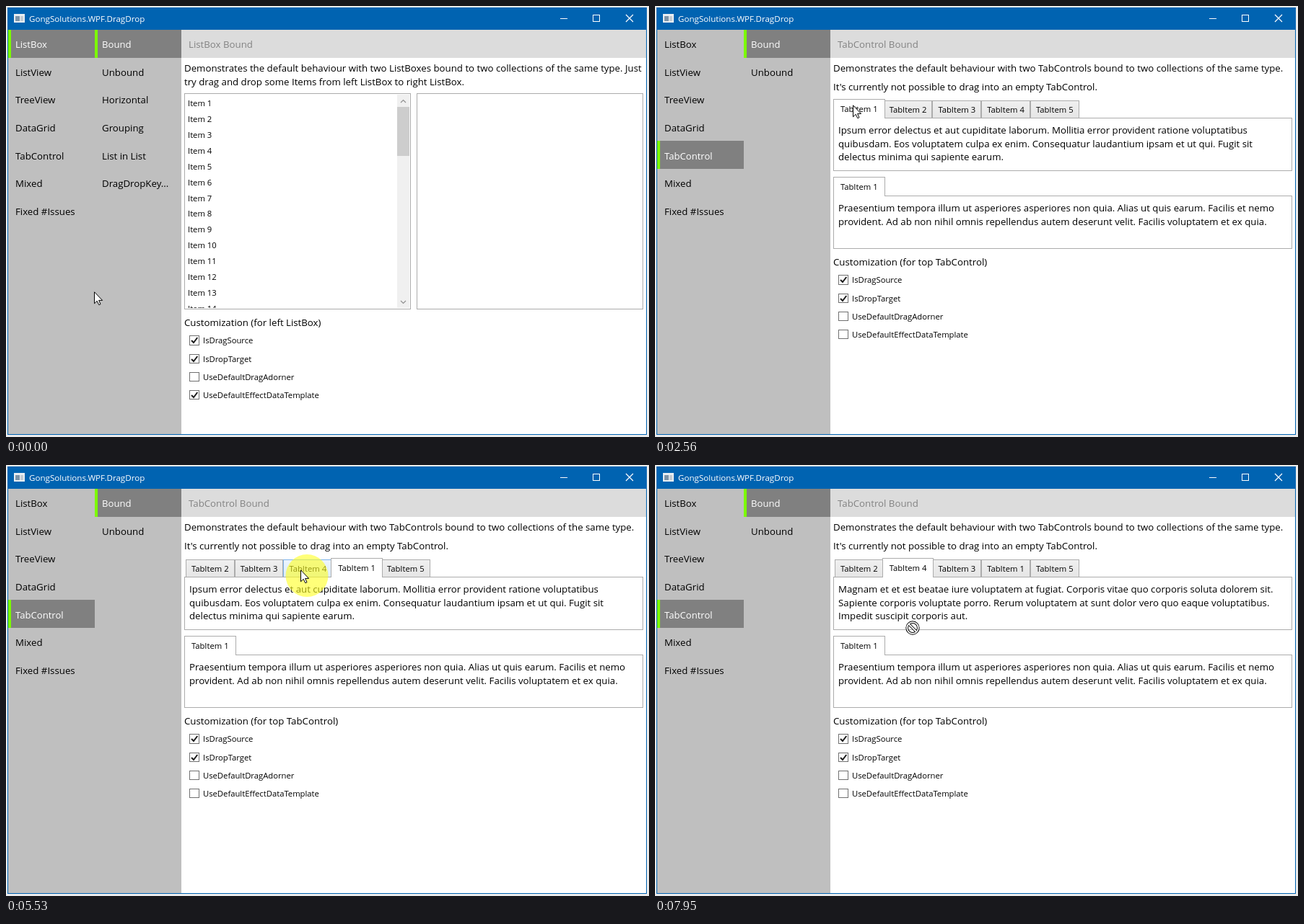
Write an HTML page that moves like this. It is 891 px wide and 598 px high and loops after 8000 ms.

```html
<!DOCTYPE html>
<html lang="en">
<head>
<meta charset="utf-8">
<title>Drag and drop demo</title>
<style>
html, body { margin: 0; width: 100%; height: 100%; overflow: hidden; background: #ececec; }
svg { display: block; }
#stage { position: absolute; left: 0; top: 0; font-family: "Open Sans", "Noto Sans", sans-serif; }
text { white-space: pre; }
.body { font-size: 13.25px; }
.selected { font-size: 13.1px; font-weight: 500; }
.small { font-size: 11.25px; }
.title { font-size: 11.6px; }
rect, .crisp { shape-rendering: crispEdges; }
</style>
</head>
<body>
<svg id="stage" width="891" height="598" viewBox="0 0 891 598"></svg>
<script>
const LOOP = 8000;
const ROW = 38.67;
const TAB_LEFT = 248.9, TAB_WIDTH = 67.75;
const BORDER = '#acacac';

const PAGE_SWITCH = 1070, FIRST_DROP = 4600, TAB_SELECT = 5620, SECOND_DROP = 6780;

// Pointer moves: first step, last step, number of steps, way points.
const START = [122, 396];
const MOVES = [
  [280, 600, 5, [33, 206]],
  [830, 980, 3, [29, 212]],
  [1530, 1530, 1, [145, 211]],
  [1610, 2260, 9, [351, 190], [270, 135]],
  [2560, 2650, 2, [278, 139]],
  [3040, 3280, 4, [350, 133]],
  [3360, 3580, 4, [418, 142]],
  [3670, 4290, 9, [499, 143]],
  [4600, 4600, 1, [499, 146]],
  [4920, 5300, 6, [455, 148], [408, 145]],
  [5700, 6260, 8, [329, 147]],
  [6320, 6320, 1, [329, 146]],
  [6780, 6780, 1, [328, 144]],
  [7180, 7180, 1, [341, 144]],
  [7260, 7260, 1, [348, 141]],
  [7550, 7950, 6, [357, 226]]
];
const PRESSED = [[1070, 1150], [2800, 2960], [5470, 5700], [7410, 7550]];
const DRAGGING = [[3360, 4600], [5700, 6780], [7550, 7630]];
const FORBIDDEN = [[3040, 3360], [7630, 8000]];

const MENU = ['ListBox', 'ListView', 'TreeView', 'DataGrid', 'TabControl', 'Mixed', 'Fixed #Issues'];
const LIST_MENU = ['Bound', 'Unbound', 'Horizontal', 'Grouping', 'List in List', 'DragDropKey...'];
const TAB_MENU = ['Bound', 'Unbound'];

const TAB_TEXT = {
  1: ['Ipsum error delectus et aut cupiditate laborum. Mollitia error provident ratione voluptatibus',
      'quibusdam. Eos voluptatem culpa ex enim. Consequatur laudantium ipsam et ut qui. Fugit sit',
      'delectus minima qui sapiente earum.'],
  4: ['Magnam et et est beatae iure voluptatem at fugiat. Corporis vitae quo corporis soluta dolorem sit.',
      'Sapiente corporis voluptate porro. Rerum voluptatem at sunt dolor vero quo eaque voluptatibus.',
      'Impedit suscipit corporis aut.']
};
const LOWER_TEXT = [
  'Praesentium tempora illum ut asperiores asperiores non quia. Alias ut quis earum. Facilis et nemo',
  'provident. Ad ab non nihil omnis repellendus autem deserunt velit. Facilis voluptatem et ex quia.'
];

const during = (spans, t) => spans.some(([from, to]) => t >= from && t < to);
const smooth = p => p * p * (3 - 2 * p);

function alongPath(points, p) {
  const pos = p * (points.length - 1);
  const i = Math.min(Math.floor(pos), points.length - 2);
  return [0, 1].map(k => Math.round(points[i][k] + (points[i + 1][k] - points[i][k]) * (pos - i)));
}

function pointerAt(t) {
  let at = START;
  for (const [from, to, steps, ...points] of MOVES) {
    if (t < from) break;
    const gap = steps > 1 ? (to - from) / (steps - 1) : 1;
    const done = Math.min(steps, 1 + Math.floor((t - from) / gap + 1e-6));
    at = alongPath([at, ...points], smooth(done / steps));
  }
  return at;
}

const fill = (x, y, w, h, color) => `<rect x="${x}" y="${y}" width="${w}" height="${h}" fill="${color}"/>`;
const box = (x, y, w, h, color = '#fff', line = BORDER) =>
  `<rect x="${x + .5}" y="${y + .5}" width="${w - 1}" height="${h - 1}" fill="${color}" stroke="${line}"/>`;
const label = (x, y, str, kind = 'body', color = '#000') =>
  `<text x="${x}" y="${y}" class="${kind}" fill="${color}">${str}</text>`;
const stroke = (d, color, width = 1, extra = '') =>
  `<path d="${d}" fill="none" stroke="${color}" stroke-width="${width}" ${extra}/>`;
const paragraph = (x, y, lines) => lines.map((line, i) => label(x, y + 18.5 * i, line)).join('');

function windowFrame() {
  return box(2, 2, 886, 593, '#fff', '#0063b1') + fill(2, 2, 886, 31, '#0063b1') +
    fill(11, 11, 15, 12, '#e9eef2') + fill(13, 14, 6, 7, '#7d94a8') + fill(20, 14, 4, 7, '#c3ccd4') +
    label(32, 22, 'GongSolutions.WPF.DragDrop', 'title', '#fff') +
    stroke('M768 17.5H778M813.5 12.5H822.5V21.5H813.5Z', '#fff', 1, 'class="crisp"') +
    stroke('M859 12L869 22M869 12L859 22', '#fff', 1.2) +
    fill(3, 33, 240, 561, '#bfbfbf') + fill(243, 33, 644, 39, '#dcdcdc');
}

function menu(x, names, selected, hovered) {
  return names.map((name, i) => {
    const top = Math.round(33 + ROW * i - .3);
    const on = i === selected;
    const back = on ? fill(x, top, 120, 39, '#808080') + fill(x, top, 4, 39, '#7cfc00')
      : i === hovered ? fill(x, top, 120, 39, '#a3a3a3') : '';
    const text = on ? ['selected', '#fff'] : ['body', '#000'];
    return back + label(x + 10, Math.round(58 + ROW * i), name, ...text);
  }).join('');
}

function options(y, side, checks) {
  const names = ['IsDragSource', 'IsDropTarget', 'UseDefaultDragAdorner', 'UseDefaultEffectDataTemplate'];
  return label(247, y, `Customization (for ${side})`) + names.map((name, i) => {
    const edge = y + 13.4 + 25.2 * i;
    const top = Math.round(edge), height = Math.round(edge + 13.3) - top;
    const tick = checks[i] ? stroke(`M257 ${top + 7}L260 ${top + 10}L265.3 ${top + 3}`, '#1a1a1a', 2) : '';
    return box(254, top, 14, height, '#fff', '#707070') + tick + label(273, top + 11, name, 'small');
  }).join('');
}

function listPage() {
  const items = Array.from({ length: 14 }, (_, i) => label(4, 17 + 21.92 * i, `Item ${i + 1}`, 'small')).join('');
  return label(253, 58, 'ListBox Bound', 'body', '#838383') +
    paragraph(247, 91, [
      'Demonstrates the default behaviour with two ListBoxes bound to two collections of the same type. Just',
      'try drag and drop some Items from left ListBox to right ListBox.']) +
    box(247, 121, 314, 300) + box(569, 121, 314, 300) +
    `<svg x="248" y="122" width="294" height="297">${items}</svg>` +
    fill(542, 123, 17, 296, '#f0f0f0') + fill(542, 140, 17, 68, '#cdcdcd') +
    stroke('M547 134L550.5 130.5L554 134M547 409L550.5 412.5L554 409', '#909090', 1.2) +
    options(444, 'left ListBox', [1, 1, 0, 1]);
}

const tabX = i => Math.round(TAB_LEFT + TAB_WIDTH * i);
const tabLabel = (i, y, id) => label(TAB_LEFT + TAB_WIDTH * i + 8, y, `TabItem ${id}`, 'small');

function plainTab(i, id, hovered) {
  const [back, line] = hovered ? ['url(#hover)', '#7eb4ea'] : ['url(#tab)', BORDER];
  return box(tabX(i), 131, tabX(i + 1) - tabX(i), 25, back, line) + tabLabel(i, 148, id);
}

function activeTab(i, id, top) {
  const left = tabX(i) - 2, right = tabX(i + 1) + 2;
  return fill(left + 1, top + 1, right - left - 2, 26, '#fff') +
    stroke(`M${left + .5} ${top + 27}V${top + .5}H${right - .5}V${top + 27}`, BORDER, 1, 'class="crisp"') +
    tabLabel(i, top + 18, id);
}

function tabPage(t, [px, py], free) {
  const order = t < FIRST_DROP ? [1, 2, 3, 4, 5] : t < SECOND_DROP ? [2, 3, 4, 1, 5] : [2, 4, 3, 1, 5];
  const selected = t < TAB_SELECT ? 1 : 4;
  const slot = free && py >= 131 && py < 156 ? Math.floor((px - TAB_LEFT) / TAB_WIDTH) : -1;
  const tabs = order.map((id, i) => id === selected ? '' : plainTab(i, id, i === slot)).join('');
  return label(253, 58, 'TabControl Bound', 'body', '#838383') +
    label(247, 91, 'Demonstrates the default behaviour with two TabControls bound to two collections of the same type.') +
    label(247, 117, "It's currently not possible to drag into an empty TabControl.") +
    tabs + box(247, 155, 636, 74) + activeTab(order.indexOf(selected), selected, 129) +
    paragraph(254, 177, TAB_TEXT[selected]) +
    box(247, 263, 636, 74) + activeTab(0, 1, 237) + paragraph(254, 285, LOWER_TEXT) +
    options(360, 'top TabControl', [1, 1, 0, 0]);
}

function insertMark(px) {
  const x = tabX(Math.round((px - TAB_LEFT) / TAB_WIDTH));
  return stroke(`M${x} 131V156`, '#808080', 2) +
    `<path d="M${x - 5} 131h10l-5 5zM${x - 5} 156h10l-5 -5z" fill="#808080"/>`;
}

function pointer([x, y], dragging, forbidden) {
  if (forbidden) {
    const ring = (color, width) => `<circle r="7.8" fill="none" stroke="${color}" stroke-width="${width}"/>` +
      stroke('M-5.5 -5.5L5.5 5.5', color, width);
    return `<g transform="translate(${x} ${y})">${ring('#000', 3.7)}${ring('#fff', 1.8)}</g>`;
  }
  const parcel = dragging
    ? '<rect x="7.5" y="15.5" width="9" height="6" fill="#fff" stroke="#000" stroke-dasharray="1 1"/>' : '';
  return `<g transform="translate(${x} ${y})">${parcel}
    <path d="M.5 .8V16.8L4.2 13.3L6.8 18.7L9 17.7L6.6 12.4H11.6Z" fill="#fff" stroke="#000"/></g>`;
}

const gradient = (id, from, to) => `<linearGradient id="${id}" x2="0" y2="1">
  <stop stop-color="${from}"/><stop offset="1" stop-color="${to}"/></linearGradient>`;
const DEFS = `<defs>${gradient('tab', '#f0f0f0', '#e5e5e5')}${gradient('hover', '#ecf4fc', '#dcecfc')}</defs>`;

function scene(t) {
  const at = pointerAt(t);
  const [x, y] = at;
  const dragging = during(DRAGGING, t), forbidden = during(FORBIDDEN, t);
  const onTabs = t >= PAGE_SWITCH;
  const hovered = x < 123 ? Math.floor((y - 33) / ROW) : -1;
  return DEFS + windowFrame() +
    menu(3, MENU, onTabs ? 4 : 0, hovered) +
    menu(123, onTabs ? TAB_MENU : LIST_MENU, 0, -1) +
    (onTabs ? tabPage(t, at, !dragging && !forbidden) : listPage()) +
    (dragging ? insertMark(x) : '') +
    (during(PRESSED, t) ? `<circle cx="${x + 9}" cy="${y + 8.5}" r="29.5" fill="#ffff20" opacity=".6"/>` : '') +
    pointer(at, dragging, forbidden);
}

const stage = document.getElementById('stage');
let shown = '';
function tick(now) {
  const next = scene(now % LOOP);
  if (next !== shown) stage.innerHTML = shown = next;
  requestAnimationFrame(tick);
}
tick(0);
</script>
</body>
</html>
```
